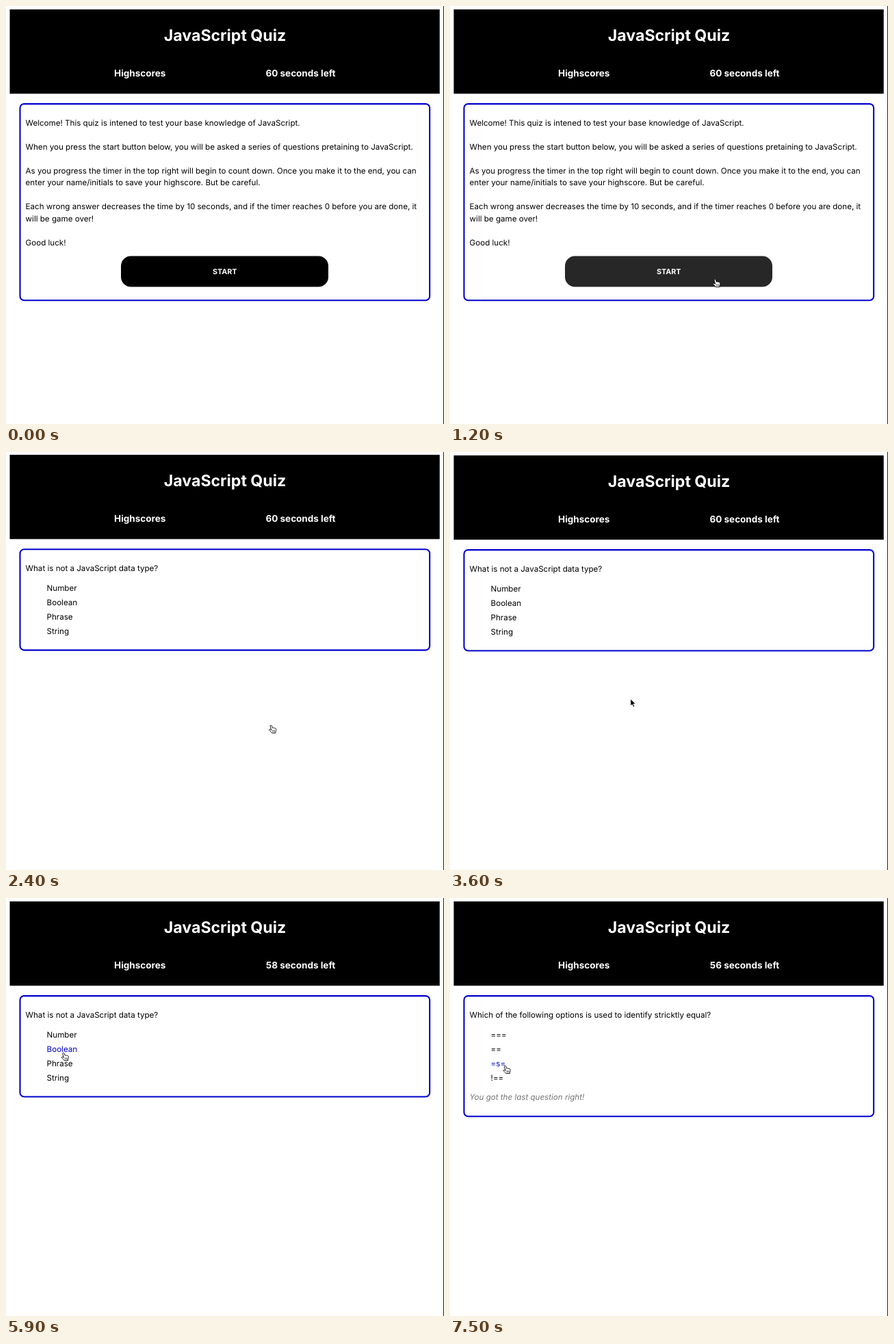
An HTML page for the animation above (8 s loop, 640 by 611 pixels).

```html
<!DOCTYPE html>
<html lang="en">
<head>
<meta charset="utf-8">
<title>JavaScript Quiz</title>
<style>
  html, body { margin: 0; width: 100%; height: 100%; overflow: hidden; background: #fff; }
  svg { display: block; width: 100%; height: 100%; }
  text {
    font-family: Inter, "Open Sans", sans-serif;
    font-size: 11.6px;
    font-optical-sizing: none;
    font-feature-settings: "calt" 0;
    text-rendering: geometricPrecision;
    white-space: pre;
  }
  .bold { font-weight: 700; fill: #fff; text-anchor: middle; }
  .title { font-size: 23.1px; }
  .sub { font-size: 13.5px; }
  .start { font-size: 10.7px; }
  .note { font-style: italic; fill: #757575; }
</style>
</head>
<body>
<svg viewBox="0 0 640 611">
  <rect x="639" width="1" height="611" fill="#222"/>
  <g id="page">
    <rect x="5.5" y="5" width="628.2" height="123.2"/>
    <text class="bold title" x="320" y="51">JavaScript Quiz</text>
    <text class="bold sub" x="195.7" y="103">Highscores</text>
    <text class="bold sub" x="430.5" y="103" id="timer"></text>
    <rect id="card" x="20.5" y="143.1" width="598.6" rx="6" fill="#fff" stroke="#0000cd" stroke-width="2.1"/>
    <g id="intro">
      <g id="copy"></g>
      <rect id="button" x="168" y="365.5" width="303" height="45" rx="14.5"/>
      <text class="bold start" x="319.7" y="391.8">START</text>
    </g>
    <g id="quiz">
      <text id="question" x="28.6" y="175"></text>
      <g id="options"></g>
      <text id="note" class="note" x="28.6" y="295.2">You got the last question right!</text>
    </g>
  </g>
  <g id="cursor">
    <path id="arrow" d="M0 0V10.2L2.4 8 4.1 11.9 5.9 11.1 4.2 7.3H7.4Z" stroke="#fff" stroke-width=".8"/>
    <g id="hand" stroke="#000" stroke-width=".9" stroke-linejoin="round" stroke-linecap="round">
      <path fill="#fff" d="M-1.6 1.3C-1.6-.1.1-.3.6.9L1.9 4.2C2.7 3.4 3.7 3.7 4 4.4 4.8 3.8 5.6 4.2 5.8 4.9 6.7 4.6 7.2 5.3 7.2 6.2 7.3 8 6.9 8.9 6.3 10V11.6H.8C.2 10.2-1.4 9-2.8 7.8-3.7 6.8-2.5 5.7-1.4 6.4L-.2 7.1Z"/>
      <path fill="none" stroke-width=".6" d="M2 7.7V9.8M3.6 7.6V9.8M5.1 7.6V9.8"/>
    </g>
  </g>
</svg>
<script>
const LOOP = 8000, STEP = 100, LINE = 17.45;
const $ = id => document.getElementById(id);

const copy = [
  [0, 'Welcome! This quiz is intened to test your base knowledge of JavaScript.'],
  [2, 'When you press the start button below, you will be asked a series of questions pretaining to JavaScript.'],
  [4, 'As you progress the timer in the top right will begin to count down. Once you make it to the end, you can'],
  [5, 'enter your name/initials to save your highscore. But be careful.'],
  [7, 'Each wrong answer decreases the time by 10 seconds, and if the timer reaches 0 before you are done, it'],
  [8, 'will be game over!'],
  [10, 'Good luck!']
];
const quizzes = [
  { ask: 'What is not a JavaScript data type?', options: ['Number', 'Boolean', 'Phrase', 'String'] },
  { ask: 'Which of the following options is used to identify stricktly equal?', options: ['===', '==', '=s=', '!=='] }
];
// Pointer tip: time, x, y
const path = [
  [500, 412, 508], [900, 394, 406], [1200, 387.6, 399.2], [3200, 387.6, 399.2],
  [3600, 263.8, 361], [4100, 96, 290], [4400, 82, 271], [4500, 82, 271],
  [4600, 82, 267], [4700, 82, 267], [4900, 85, 247], [5400, 84.3, 226],
  [5900, 84.3, 226], [6200, 84.6, 238.6], [7100, 84.6, 238.6], [7500, 81, 245]
];

function addText(parent, x, y, str = '') {
  const el = document.createElementNS('http://www.w3.org/2000/svg', 'text');
  el.setAttribute('x', x);
  el.setAttribute('y', y);
  el.textContent = str;
  parent.append(el);
  return el;
}
for (const [row, str] of copy) addText($('copy'), 28.6, 175 + row * LINE, str);
const options = [0, 1, 2, 3].map(i => addText($('options'), 59.6, 203.8 + i * 21));

const show = (id, on) => $(id).setAttribute('display', on ? 'inline' : 'none');

function pointerAt(t) {
  const i = path.findIndex(p => p[0] > t);
  if (i < 0) return path.at(-1).slice(1);
  if (i === 0) return path[0].slice(1);
  const [a, b] = [path[i - 1], path[i]];
  const k = (t - a[0]) / (b[0] - a[0]);
  return [a[1] + (b[1] - a[1]) * k, a[2] + (b[2] - a[2]) * k];
}

function render(t) {
  const [x, y] = pointerAt(t);
  const stage = t < 2400 ? 0 : t < 6400 ? 1 : 2;
  const overButton = stage === 0 && t >= 500 && y < 410;
  const row = stage && x < 105 && y < 273 ? Math.floor((y - 189) / 21) : -1;
  const useHand = overButton || (stage === 1 && t < 2800) || row >= 0;
  const scrolled = t >= 1600 && t < 2800;

  $('page').setAttribute('transform', `translate(0 ${scrolled ? -0.9 : 0})`);
  $('timer').textContent = `${60 - Math.max(0, Math.floor((t - 3400) / 1000))} seconds left`;
  $('card').setAttribute('height', [287.1, 147.4, 176.2][stage]);
  $('button').setAttribute('fill', overButton ? '#272727' : '#000');
  show('intro', stage === 0);
  show('quiz', stage > 0);
  show('note', stage === 2);
  if (stage) {
    const quiz = quizzes[stage - 1];
    $('question').textContent = quiz.ask;
    options.forEach((el, i) => {
      el.textContent = quiz.options[i];
      el.setAttribute('fill', i === row ? '#0000cd' : '#000');
    });
  }
  show('cursor', t >= 500);
  show('hand', useHand);
  show('arrow', !useHand);
  $('cursor').setAttribute('transform', `translate(${x} ${y})`);
}

const start = performance.now();
function tick() {
  const t = (performance.now() - start) % LOOP;
  render(Math.floor(t / STEP) * STEP);
  requestAnimationFrame(tick);
}
tick();
</script>
</body>
</html>
```
